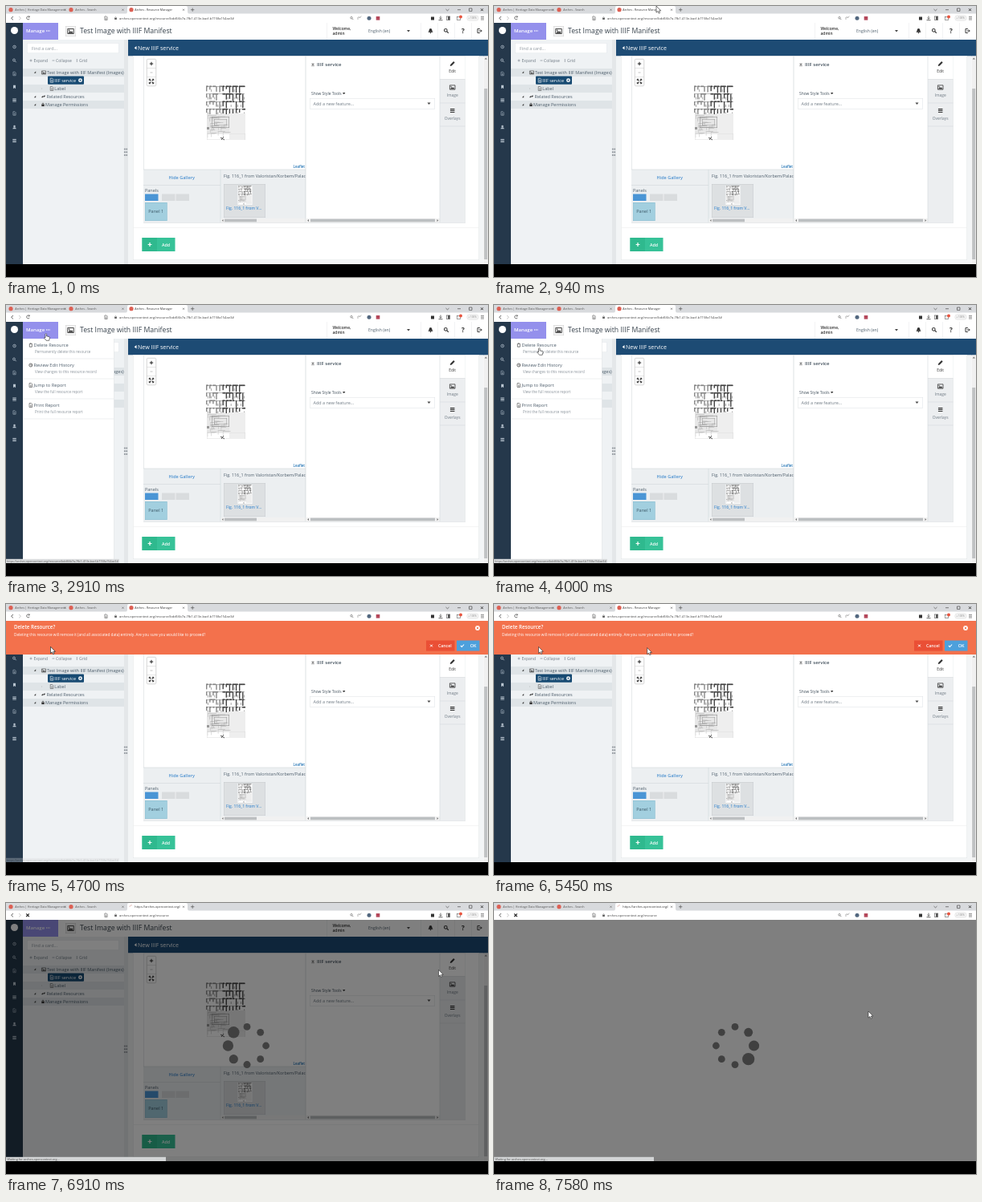
Recreate the animation shown at these times as an HTML page. Size 600 px wide and 338 px high, loop 7.61 s.

```html
<!DOCTYPE html>
<html lang="en">
<head>
<meta charset="utf-8">
<title>Delete a resource</title>
<style>
html, body { margin: 0; width: 100%; height: 100%; overflow: hidden; background: #000; }
svg { display: block; width: 600px; height: 338px; }
text { font-family: "Open Sans", "Noto Sans", sans-serif; white-space: pre; }
</style>
</head>
<body>
<svg id="stage" viewBox="0 0 600 338" xmlns="http://www.w3.org/2000/svg"></svg>
<script>
const LOOP = 7610;
const INK = '#4d5d6b', GREY = '#6f7a84', NAVY = '#25384b', BLUE = '#4a90d0';
const ADDRESS = 'arches.opencontext.org/resource';
const RECORD = ADDRESS + '/bdd66b7a-7fb1-413e-bacf-b7158a154ae3#';

// Drawing helpers; text is placed by its vertical centre.
const rect = (x, y, w, h, fill, more = '') =>
  `<rect x="${x}" y="${y}" width="${w}" height="${h}" fill="${fill}" ${more}/>`;
const box = (x, y, w, h, fill, stroke, more = '') =>
  rect(x + .25, y + .25, w - .5, h - .5, fill, `stroke="${stroke}" stroke-width=".5" ${more}`);
const disc = (x, y, r, fill, more = '') =>
  `<circle cx="${x}" cy="${y}" r="${r}" fill="${fill}" ${more}/>`;
const line = (d, stroke, width = .6, more = '') =>
  `<path d="${d}" fill="none" stroke="${stroke}" stroke-width="${width}" ${more}/>`;
const shape = (d, fill, more = '') => `<path d="${d}" fill="${fill}" ${more}/>`;
const text = (x, y, size, str, fill = INK, weight = 400, more = '') =>
  `<text x="${x}" y="${(y + size * .35).toFixed(2)}" font-size="${size}" fill="${fill}" font-weight="${weight}" ${more}>${str}</text>`;
const group = (id, body, more = '') => `<g id="${id}" ${more}>${body}</g>`;
const at = (x, y, body, k = 1) => `<g transform="translate(${x} ${y}) scale(${k})">${body}</g>`;

// Icons, drawn around their own centre.
const icon = {
  lens: c => disc(-.6, -.6, 1.6, 'none', `stroke="${c}" stroke-width=".9"`) + line('M.6 .6L2.4 2.4', c, 1),
  clock: c => disc(0, 0, 2, 'none', `stroke="${c}" stroke-width=".8"`) + line('M0-1V.2H1', c),
  page: c => line('M-1.8-2.5H.7L1.8-1.4V2.5H-1.8ZM-.8 0H.8M-.8 1.2H.8', c, .6),
  mark: c => shape('M-1.7-2.5H1.7V2.5L0 1-1.7 2.5Z', c),
  list: c => line('M-2.5-1.8H2.5M-2.5 0H2.5M-2.5 1.8H2.5', c, 1.1),
  user: c => disc(0, -1.2, 1.4, c) + shape('M-2.5 2.5Q-2.2 .3 0 .3T2.5 2.5Z', c),
  image: c => line('M-3-2.4H3V2.4H-3Z', c, .7) + shape('M-2.4 1.8L-.8-.4 .3 .7 1.2-.3 2.5 1.8Z', c) + disc(-1.5, -1.1, .6, c),
  bell: c => shape('M-2.8 1.7Q-1.7 .7-1.7-.8-1.5-2.7 0-2.8 1.5-2.7 1.7-.8 1.7 .7 2.8 1.7Z', c) + disc(0, 2.3, .7, c),
  exit: c => line('M.4-2.4H-2.4V2.4H.4M-1 0H2.6M1.2-1.4L2.6 0 1.2 1.4', c, .9),
  cross: c => line('M-1.4-1.4L1.4 1.4M1.4-1.4L-1.4 1.4', c, 1),
  tick: c => line('M-2 0L-.6 1.5 2.1-1.5', c, 1.1),
  pen: c => shape('M-2.7 2.7L-2.2 .8 1.3-2.7 2.7-1.3-.8 2.2Z', c),
  trash: c => line('M-2-1.6H2M-1.5-1V2.2H1.5V-1M-.6-2.3H.6', c, .7),
  lock: c => rect(-1.7, -.4, 3.4, 2.5, c) + line('M-1-.3V-1.3Q0-2.7 1-1.3V-.3', c, .6),
  link: c => line('M-1.9 1.1L-.2-.5M.3 .4L2-1.2', c, 1.3),
  fold: c => shape('M1.2-1.2V1.2H-1.2Z', c)
};
const draw = (name, x, y, color, k = 1) => at(x, y, icon[name](color), k);

function random(seed) {
  return () => (seed = seed * 16807 % 2147483647) / 2147483647;
}

// Floor plan, 50 by 70: dark walls above, faint outlines below.
function plan() {
  const r = random(71);
  let s = '';
  for (let row = 0; row < 4; row++) {
    const y = 2 + row * 9.5;
    s += rect(row % 2 ? 0 : 1, y, 48, .5, '#777');
    for (let i = 0; i < 12; i++) {
      const x = i * 4.1, dark = i > 4 ? '#444' : '#888';
      if (r() < .72) s += rect(x, y - .6, 2.3 + r() * 2, 1.7, dark);
      if (r() < .68) s += rect(x, y, 1.4, 3 + r() * 6, dark);
      if (r() < .4) s += rect(x + 2, y + 4, 1, 3, '#aaa');
    }
  }
  s += rect(1, 37, 30, 24, '#e7e7e7') + rect(29, 36, 20, 32, '#eee');
  for (let i = 0; i < 24; i++) {
    const y = 37 + r() * 24, x = 1 + r() * 22;
    s += rect(x, y, 5 + r() * 6, .5, '#aaa') + rect(x, y, .5, 3 + r() * 3, '#bbb');
  }
  s += box(7, 40, 22, 14, 'none', '#888') + box(10, 43, 16, 8, 'none', '#999');
  s += box(1, 61, 48, 8, 'none', '#ddd') + rect(1, 53, 3, 3, '#999');
  return s + line('M18 66L23 69M19 69L22 65', '#555', 1);
}

function browser() {
  let s = rect(0, 0, 600, 10, '#d8dadd') + rect(0, 9.5, 600, 11.5, '#fff');
  s += shape('M149 10Q151 9.5 151 7V2Q151 0 153 0H224Q226 0 226 2V7Q226 9.5 228 10Z', '#fff');
  for (const [x, label] of [[3, 'Arches | Heritage Data Management'], [78, 'Arches - Search']])
    s += disc(x + 3, 4.7, 2.6, '#dc6054') + text(x + 8.3, 4.7, 3.7, label, '#555');
  for (const x of [74.5, 146.5, 222]) s += draw('cross', x - 1, 4.7, '#666', .7);
  s += line('M230 4.7H234.4M232.2 2.5V6.9', '#555', .7);
  s += group('idleTab', disc(156, 4.7, 2.6, '#dc6054') + text(160.3, 4.7, 3.7, 'Arches - Resource Manager', '#333')
    + text(141, 15.2, 4, RECORD, '#444') + line('M29 13.4A2 2 0 1 0 29.3 16M29.2 12.4V14H27.6', '#444', .7));
  s += group('busyTab', line('M154 5A2 2 0 0 1 157 3', '#d9a79f', .7)
    + `<svg x="160" y="0" width="57" height="10">${text(.3, 4.7, 3.8, 'https://' + ADDRESS, '#333')}</svg>`
    + text(141, 15.2, 4, ADDRESS, '#444') + draw('cross', 27, 15.2, '#333', 1.3));
  s += line('M9 13L6.5 15.2 9 17.4', '#444', .8) + line('M16 13L18.5 15.2 16 17.4', '#bbb', .8);
  s += draw('page', 124.5, 15.2, '#444', .9) + draw('lock', 136.5, 15.2, '#555', .8);
  s += draw('lens', 430.5, 15.2, '#777', .8) + line('M438 17V14H441M440 15L442.5 12.7', '#888', .6);
  s += disc(452, 15.2, 2.5, '#52677f') + rect(460.7, 13, 4.6, 4.6, '#b4475a');
  s += rect(529, 13.5, 4, 4, '#333') + line('M541 12.5V16M539.4 14.8L541 16.4 542.6 14.8M538.5 17.6H543.5', '#333', .7);
  s += box(548, 12.7, 5, 5, '#fff', '#333') + rect(550, 13, 2.5, 4.4, '#555');
  s += box(561, 13, 5, 4.5, '#fff', '#444') + disc(566, 13.5, 2, '#e8553f');
  s += box(573.5, 11.5, 15, 7, '#f2f2f2', '#ddd', 'rx="3"') + text(575.5, 15.2, 3, '+ 100%', '#888');
  s += line('M591 13.4H595M591 15.2H595M591 17H595', '#444', .6);
  s += line('M547.5 4L549.5 5.8 551.5 4M562 4.7H566M576.5 3H580V6.4H576.5Z', '#333', .6);
  return s + draw('cross', 592.5, 4.7, '#333');
}

function sidebar() {
  let s = rect(0, 21, 21, 301, NAVY) + disc(10.5, 30.5, 4.5, '#fff');
  ['clock', 'lens', 'page', 'mark', 'list', 'page', 'user', 'list'].forEach((n, i) =>
    s += draw(n, 10.5, [51, 68, 84.5, 101, 117.5, 134, 151, 168][i], '#b7c3ce', .9));
  return s;
}

function header() {
  let s = rect(21, 21, 579, 21, '#fff') + rect(21, 21, 44, 21, '#9490ec');
  s += text(25, 31, 6, 'Manage', '#fff', 600);
  for (const x of [50.5, 52.3, 54.1]) s += disc(x, 31, .65, '#fff');
  s += box(74, 25, 13, 13, '#f5f5f5', '#ccc') + draw('image', 80.5, 31.5, '#333', 1.25);
  s += text(92, 31.3, 8.7, 'Test Image with IIIF Manifest', '#37424c');
  s += line('M399.5 21V42M516.5 21V42M537.5 21V42M558.5 21V42M579.5 21V42', '#e9ebed', .6);
  s += text(406.5, 28, 4.9, 'Welcome,', '#333', 600) + text(406.5, 34.3, 4.9, 'admin', '#333', 600);
  s += text(451, 31.3, 5.1, 'English (en)') + shape('M499 30H503L501 32.4Z', '#444');
  s += draw('bell', 528.5, 31, '#333', 1.1) + draw('lens', 548, 31, '#333', 1.15);
  return s + text(567, 31, 8, '?', '#333', 700) + draw('exit', 589.5, 31, '#333', 1.05);
}

function tree() {
  let s = rect(21, 42, 126, 280, '#eff2f4') + box(26, 46, 114.5, 13, '#fff', '#e2e6e9');
  s += text(32, 52.7, 5.4, 'Find a card...', '#8b949c');
  s += line('M29.5 68H32.5M31 66.5V69.5M57.5 68H60.5M88.3 66V70', '#6f7a84', .6);
  s += text(34.6, 68, 5, 'Expand', GREY) + text(62, 68, 5, 'Collapse', GREY) + text(91, 68, 5, 'Grid', GREY);
  for (const y of [78, 98, 118]) s += rect(21, y, 126, 10, '#dfe4e7');
  for (const y of [82.5, 113, 123]) s += draw('fold', 36, y, '#444');
  s += draw('image', 47, 83, '#333', .85) + text(51, 83, 5.5, 'Test Image with IIIF Manifest (Images)');
  s += rect(52, 87.5, 45, 10.3, '#174a72', 'rx="1"') + draw('page', 57, 92.7, '#fff');
  s += text(60.3, 92.7, 5.5, 'IIIF service', '#fff') + disc(92.5, 92.7, 2.4, '#fff') + line('M91.2 92.7H93.8M92.5 91.4V94', '#174a72', .6);
  s += text(44, 103, 4, '›', '#999') + draw('page', 57, 103, '#555') + text(60.3, 103, 5.5, 'Label');
  s += draw('link', 46.5, 113, '#333') + text(50.5, 113, 5.5, 'Related Resources');
  s += draw('lock', 46, 123, '#333') + text(49, 123, 5.5, 'Manage Permissions');
  s += rect(147, 42, 5, 280, '#e4e7e9');
  for (let i = 0; i < 6; i++) s += disc(147.8 + i % 2 * 2.4, 178.5 + (i >> 1) * 3.7, 1, '#8d949a');
  return s;
}

function gallery() {
  let s = rect(171, 204, 202, 66, '#eceff1') + line('M171 204H373M171 223.5H267M267 204V270', '#d2d7da', .6);
  s += text(202.5, 214, 5.5, 'Hide Gallery', BLUE, 600) + text(173, 230.5, 5.5, 'Panels');
  s += rect(173, 234.5, 16.5, 8.5, '#4a95d5') + rect(194, 234.5, 16.5, 8.5, '#d9dcde') + rect(211.5, 234.5, 16.5, 8.5, '#d9dcde');
  s += box(173, 245, 27.5, 23, '#a2cfdf', '#79b5cb') + text(177.3, 256.5, 5.5, 'Panel 1', '#3b5766');
  s += `<svg x="268" y="204" width="105" height="18">${text(3, 8, 5.4, 'Fig. 116_1 from Valoristan/Korbem/Palace')}</svg>`;
  s += box(271, 222, 52, 42, '#dde0e2', '#c5c9cc') + rect(288.5, 224, 18, 24, '#fff') + at(289, 224, plan(), .34);
  s += text(274, 251.8, 5, 'Fig. 116_1 from V...', BLUE, 600);
  return s + rect(267.5, 265, 105.5, 5, '#f1f1f1') + rect(272, 265.6, 40, 3.7, '#bcbfc1') + shape('M270.5 266V269L268.8 267.5Z', '#777');
}

function main() {
  let s = rect(152, 42, 448, 20.5, '#1d4b74') + shape('M162.5 50V54.4L159.7 52.2Z', '#fff');
  s += text(164, 52.2, 7.1, 'New IIIF service', '#fff');
  s += rect(152, 62.5, 442, 259.5, '#f3f5f6') + box(158, 62, 431, 255, '#fff', '#e1e4e6');
  s += rect(594.5, 62.5, 5.5, 259.5, '#f0f0f0') + rect(595.2, 103, 4, 213, '#c0c2c3') + shape('M595.7 66.5H599L597.3 64.5Z', '#777');
  s += box(171, 62.5, 401, 208, '#fff', '#cfd4d7') + line('M158 276.5H589', '#eceeef');
  s += box(175, 66, 12, 34, '#fff', '#aaa', 'rx="1.5"') + line('M175 77.5H187M175 88.5H187', '#ccc', .5);
  s += line('M178.8 72H183.2M181 69.8V74.2', '#222', 1) + line('M179.5 83H182.5', '#bbb', .9);
  s += line('M178.4 91.4L183.6 96.6M183.6 91.4L178.4 96.6', '#222', 1.1) + disc(181, 94, 1.1, '#fff')
    + line('M178.2 93V91.2H180M182 91.2H183.8V93M183.8 95V96.8H182M180 96.8H178.2V95', '#222', .7);
  s += at(249, 98, plan()) + text(357.5, 200, 4.4, 'Leaflet', '#2475b5', 600);
  s += gallery() + line('M373 62.5V270', '#cfd4d7', .7);
  s += draw('cross', 382, 73.3, '#666', .9) + line('M380.5 71.8H383.5M380.5 74.8H383.5', '#666', .5);
  s += text(387, 73.3, 6, 'IIIF service', '#44525e', 600);
  s += text(380, 109, 4.9, 'Show Style Tools', '#3f4d59') + shape('M419 108H422.4L420.7 110.2Z', '#333');
  s += box(378, 115, 156, 13.5, '#fff', '#dde1e4') + text(382.5, 121.8, 5.45, 'Add a new feature...', GREY) + shape('M524.5 120.5H528.5L526.5 123Z', '#444');
  s += rect(373.5, 265, 166.5, 5, '#f1f1f1') + rect(379, 265.6, 155, 3.7, '#bcbfc1') + shape('M377 266V269L375.2 267.5ZM536.5 266V269L538.3 267.5Z', '#777');
  s += rect(540, 63, 31.5, 207, '#eceef0') + rect(540, 63, 31.5, 28.5, '#fff');
  s += line('M540 63V270M540 91.5H571.5M540 121H571.5M540 150H571.5', '#d4d9dc', .6);
  [['pen', 'Edit', 72], ['image', 'Image', 101.5], ['list', 'Overlays', 130.5]].forEach(([n, label, y], i) =>
    s += draw(n, 555.7, y, '#333', 1.1) + text(555.7, y + 9.3, 4.9, label, i ? GREY : '#333', 400, 'text-anchor="middle"'));
  s += rect(169.5, 289, 41, 17, '#37c298') + rect(169.5, 289, 18.5, 17, '#2fb98e');
  return s + line('M176.6 297.5H181.4M179 295.1V299.9', '#fff', 1.2) + text(194, 297.7, 5.3, 'Add', '#fff', 600);
}

function menu() {
  let s = rect(21, 42, 113.5, 276, '#fff') + line('M134.5 42V318H21', '#d9dde0', .5);
  [['trash', 'Delete Resource', 'Permanently delete this resource', 50],
   ['clock', 'Review Edit History', 'View changes to this resource record', 75],
   ['page', 'Jump to Report', 'View the full resource report', 100],
   ['page', 'Print Report', 'Print the full resource report', 125]].forEach(([n, title, note, y]) =>
    s += draw(n, 30.8, y, '#444') + text(34.5, y, 5.7, title) + text(36, y + 8.2, 4.5, note, '#8a939b')
      + line(`M21 ${y + 17}H134`, '#e3e6e8', .6));
  return s;
}

function notice() {
  let s = rect(0, 21, 600, 42, '#f3714c') + text(10, 29, 6.2, 'Delete Resource?', '#fff', 600);
  s += text(10, 38.5, 4.7, 'Deleting this resource will remove it (and all associated data) entirely. Are you sure you would like to proceed?', '#fff');
  s += disc(587, 30, 2.9, '#fff') + draw('cross', 587, 30, '#f3714c', .9);
  s += rect(523, 45.5, 35.5, 13, '#ea4f35') + draw('cross', 529.5, 52, '#fff') + text(538, 52, 5.2, 'Cancel', '#fff', 600);
  return s + rect(561, 45.5, 28.5, 13, '#4da0dc') + draw('tick', 568, 52, '#fff') + text(577.7, 52, 5.4, 'OK', '#fff', 600);
}

const arrow = shape('M0 0V8.2L1.9 6.5 3.1 9.2 4.5 8.6 3.3 6H5.8Z', '#fff', 'stroke="#222" stroke-width=".6"');
const hand = shape('M0 1Q.8-.6 1.6 1V3.6L4.8 4.3Q5.6 4.6 5.4 6L4.7 9H1L-1.6 5.7Q-1.2 4.6 0 5.5Z', '#fff', 'stroke="#222" stroke-width=".6"');
const dots = Array.from({ length: 8 }, (_, i) => {
  const a = i * Math.PI / 4;
  return disc(300 + 23.6 * Math.sin(a), 178 - 23.6 * Math.cos(a), 4.4, '#404040', 'class="dot"');
}).join('');

const stage = document.getElementById('stage');
stage.innerHTML = rect(0, 0, 600, 338, '#fff')
  + sidebar() + header() + tree() + main() + group('menu', menu())
  + group('notice', notice()) + group('trail', at(55.5, 53.3, arrow))
  + group('blank', rect(0, 21, 600, 301, '#fff'))
  + group('mask', rect(0, 21, 600, 301, '#000', 'opacity=".5"') + dots)
  + group('hint', rect(0, 316.8, 141, 5.2, '#d9dbdd') + text(1, 319.4, 3.55, 'https://' + RECORD, '#666'))
  + group('wait', rect(0, 316.8, 199, 5.2, '#d3d5d6') + text(1.5, 319.4, 3.8, 'Waiting for arches.opencontext.org...', '#555'))
  + browser() + rect(0, 322, 600, 16, '#000')
  + group('cursor', group('arrow', arrow) + group('hand', hand));

const part = {};
stage.querySelectorAll('g[id]').forEach(g => part[g.id] = g);
const ring = [...stage.querySelectorAll('.dot')];

// Pointer stops: time, x, y.
const path = [
  [0, 206, -12], [650, 206, -12], [850, 202, 0], [1150, 202, 0], [1900, 49, 35.3],
  [3300, 49, 35.3], [3800, 55.5, 53.3], [5150, 55.5, 53.3], [6050, 574, 58],
  [6700, 574, 58], [7250, 466, 135], [LOOP, 466, 135]
];
const clamp = v => Math.min(1, Math.max(0, v));
const ramp = (t, from, to) => {
  const u = clamp((t - from) / (to - from));
  return u * u * (3 - 2 * u);
};
const show = (name, on) => part[name].setAttribute('opacity', +on);
const move = (name, x, y) => part[name].setAttribute('transform', `translate(${x} ${y})`);

function render(t) {
  const i = path.findIndex((p, n) => n && t <= p[0]);
  const [a, b] = [path[i - 1], path[i]], u = ramp(t, a[0], b[0]);
  move('cursor', a[1] + (b[1] - a[1]) * u, a[2] + (b[2] - a[2]) * u);
  const pointing = t > 1880 && t < 4300;
  show('hand', pointing);
  show('arrow', !pointing);

  show('menu', t >= 2560 && t < 4320);
  move('notice', 0, -42 * (1 - ramp(t, 4330, 4560) + ramp(t, 6450, 6620)));
  show('notice', t >= 4330 && t < 6620);
  show('trail', t >= 4560 && t < 6450);
  show('hint', (t >= 1960) * (1 - .7 * ramp(t, 4450, 4700) - .3 * ramp(t, 4750, 4900)));

  const busy = t >= 6850;
  show('idleTab', !busy);
  show('busyTab', busy);
  show('wait', busy);
  show('mask', t >= 6480);
  show('blank', t >= 7180);

  // The swelling runs clockwise and leaves a tail of three dots.
  const head = 3 + (t - 7580) / 1300 * 8;
  ring.forEach((dot, n) => {
    const lag = ((head - n) % 8 + 8) % 8;
    const swell = lag > 7 ? lag - 7 : Math.max(0, 1 - lag / 3);
    dot.setAttribute('r', 4.4 + 3.2 * swell);
  });
}

function tick() {
  render(performance.now() % LOOP);
  requestAnimationFrame(tick);
}
tick();
</script>
</body>
</html>
```
